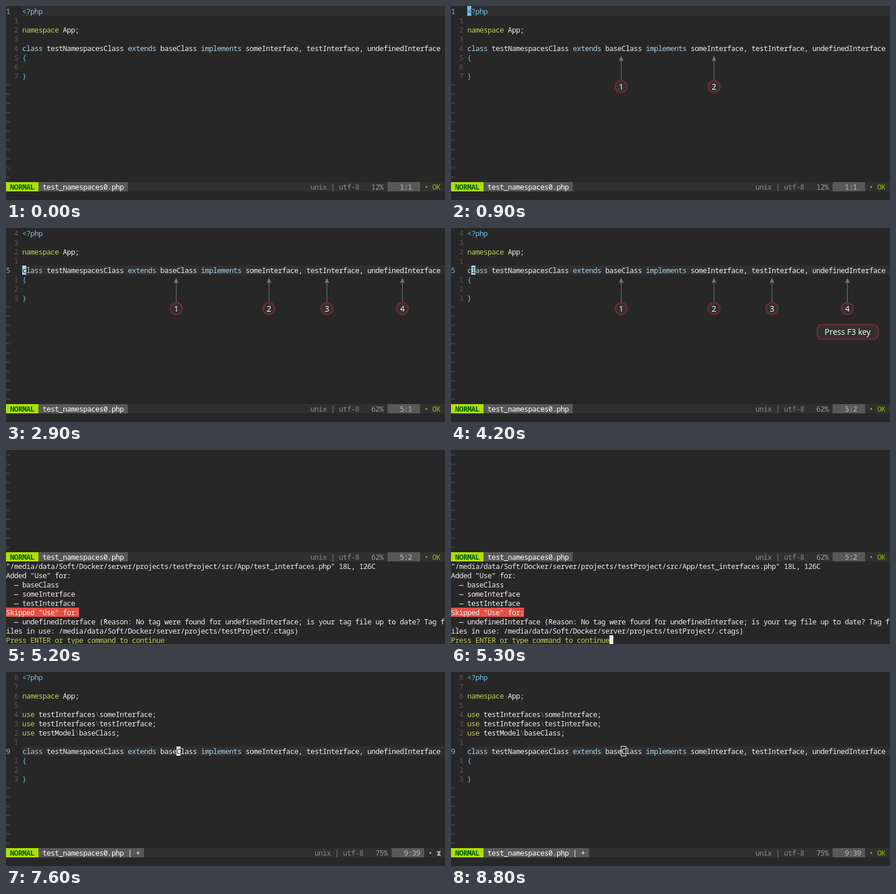
These frames come from a looping animation (757 by 336 pixels, 8900 ms). An HTML page:

```html
<!DOCTYPE html>
<html lang="en">
<head>
<meta charset="utf-8">
<title>PHP namespace import in a terminal editor</title>
<style>
  html, body { margin: 0; width: 100%; height: 100%; overflow: hidden; background: #272727; }
  #stage { position: absolute; left: 0; top: 0; width: 757px; height: 336px; overflow: hidden; background: #272727; }
  .layer, .layer > * { position: absolute; }
  .layer { inset: 0; }
  .cell, #probe {
    font: 500 12.5px/18px "Noto Sans Mono", "DejaVu Sans Mono", monospace;
    font-variant-ligatures: none;
    white-space: pre;
    height: 18px;
  }
  #probe { position: absolute; visibility: hidden; }
  .cell.bold { font-weight: 700; }
  .hollow { box-sizing: border-box; border: 1px solid #eee; }
  svg { left: 0; top: 0; }
  svg text { font: 14px "Open Sans", "Noto Sans", sans-serif; fill: #fff; text-anchor: middle; }
</style>
</head>
<body>
<div id="stage"></div>
<script>
const LOOP = 8900, CW = 7, RH = 16, TOP = 1;
const C = {
  bg: '#272727', line: '#2f2f2f', text: '#f0f0f0', dim: '#5a5a5a', sky: '#a9d3ea',
  blue: '#6fc0ea', lime: '#c6cd58', slash: '#7d7d6a', red: '#e44f45', ring: '#642c30',
  bar: '#303030', seg: '#585858', gray: '#8a8a8a', pale: '#bcbcbc'
};
const stage = document.getElementById('stage');
const start = document.timeline.currentTime || 0;

// Terminal grid: fit the font's natural advance to the cell width.
const probe = stage.appendChild(document.createElement('span'));
probe.id = 'probe';
probe.textContent = 'n'.repeat(100);
const spacing = CW - probe.getBoundingClientRect().width / 100 + 'px';
probe.remove();

// A layer is visible only during the given [from, to) spans.
function layer(...spans) {
  const el = document.createElement('div');
  el.className = 'layer';
  stage.append(el);
  const visible = t => spans.some(([a, b]) => t >= a && t < b) ? 'visible' : 'hidden';
  const times = [...new Set([0, ...spans.flat(), LOOP])].sort((a, b) => a - b);
  const keys = times.map(t => ({
    offset: t / LOOP, visibility: visible(Math.min(t, LOOP - 1)), easing: 'step-end'
  }));
  el.animate(keys, { duration: LOOP, iterations: Infinity }).startTime = start;
  return el;
}

function box(parent, x, y, w, h, color) {
  const el = document.createElement('div');
  el.style.cssText = `left:${x}px;top:${y}px;width:${w}px;height:${h}px;background:${color}`;
  parent.append(el);
  return el;
}

function put(parent, col, row, text, color = C.text, cls = '') {
  const el = document.createElement('span');
  el.className = 'cell ' + cls;
  el.textContent = text;
  el.style.cssText =
    `left:${col * CW}px;top:${TOP + row * RH}px;color:${color};letter-spacing:${spacing}`;
  parent.append(el);
}

// Parts alternate between text and colour.
function write(parent, row, ...parts) {
  let col = 4;
  for (let i = 0; i < parts.length; i += 2) {
    put(parent, col, row, parts[i], parts[i + 1]);
    col += parts[i].length;
  }
}

function fillRow(parent, col, row, cols, color) {
  const y = row ? TOP + row * RH : 0;
  box(parent, col * CW, y, cols * CW, TOP + (row + 1) * RH - y, color);
}

function cursor(col, row, char, color, ...spans) {
  const el = layer(...spans);
  fillRow(el, col, row, 1, color);
  put(el, col, row, char, C.bg);
}

function tildes(parent, from, to) {
  for (let r = from; r <= to; r++) put(parent, 0, r, '~', C.dim);
}

function gutter(parent, rows, current) {
  box(parent, 28, current ? TOP + current * RH : 0, 729, current ? RH : RH + TOP, C.line);
  for (let r = 0; r < rows; r++) {
    if (r === current) put(parent, 0, r, String(r + 1), C.blue);
    else put(parent, 2, r, String(Math.abs(r - current)), C.dim);
  }
}

function status(parent, row, file, percent, pos, busy) {
  const shift = busy ? 1 : 0;
  box(parent, 0, TOP + row * RH, 757, RH, C.bar);
  fillRow(parent, 0, row, 8, '#afdf00');
  put(parent, 1, row, 'NORMAL', '#005f00', 'bold');
  fillRow(parent, 8, row, file.length + 2, C.seg);
  put(parent, 9, row, file, '#fff');
  put(parent, 75 + shift, row, 'unix | utf-8', C.gray);
  put(parent, 90 + shift, row, percent, '#9e9e9e');
  fillRow(parent, 94 + shift, row, 8, C.seg);
  put(parent, 97 + shift, row, pos, C.pale);
  const mark = busy ? C.pale : '#8fbf10';
  put(parent, 103 + shift, row, '•', mark);
  put(parent, 105 + shift, row, busy ? '⧗' : 'OK', mark);
}

function classBlock(parent, row) {
  write(parent, row, 'class ', C.sky, 'testNamespacesClass ', C.text, 'extends ', C.sky,
    'baseClass ', C.text, 'implements ', C.sky,
    'someInterface, testInterface, undefinedInterface', C.text);
  write(parent, row + 1, '{', C.blue);
  write(parent, row + 3, '}', C.blue);
}

function header(parent) {
  write(parent, 0, '<?php', C.blue);
  write(parent, 2, 'namespace ', C.lime, 'App;', C.text);
}

const FILE = 'test_namespaces0.php';

// Editor before the import
for (const [current, percent, pos, from, to] of [
  [0, '12%', '1:1', 0, 2900],
  [4, '62%', '5:1', 2900, 3400],
  [4, '62%', '5:2', 3400, 5200]
]) {
  const el = layer([from, to]);
  gutter(el, 8, current);
  status(el, 19, FILE, percent, pos);
}
const before = layer([0, 5200]);
header(before);
classBlock(before, 4);
tildes(before, 8, 18);
cursor(4, 0, '<', C.blue, [400, 2900]);
cursor(4, 4, 'c', C.sky, [2900, 3400]);
cursor(5, 4, 'l', C.sky, [3400, 3700], [4100, 5200]);

// Callouts
const svg = body => `<svg width="757" height="336">${body}</svg>`;
[293.5, 453.5, 553.5, 683.5].forEach((x, i) => {
  layer([400 + i * 500, 5200]).innerHTML = svg(`
    <path d="M${x} 94V129" stroke="#777"/>
    <path d="M${x} 86l4 9.5l-4 -1.5l-4 1.5z" fill="#777"/>
    <circle cx="${x}" cy="139.5" r="10" fill="#303030" stroke="${C.ring}" stroke-width="3"/>
    <text x="${x}" y="144.5">${i + 1}</text>`);
});
layer([4200, 5200]).innerHTML = svg(`
  <rect x="631.5" y="167.5" width="105" height="25" rx="8" fill="#303030" stroke="${C.ring}" stroke-width="3"/>
  <text x="684" y="185">Press F3 key</text>`);

// Command output
const output = layer([5200, 7600]);
tildes(output, 0, 10);
status(output, 11, FILE, '62%', '5:2');
fillRow(output, 0, 17, 18, C.red);
[
  '"/media/data/Soft/Docker/server/projects/testProject/src/App/test_interfaces.php" 18L, 126C',
  'Added "Use" for:',
  '  — baseClass',
  '  — someInterface',
  '  — testInterface',
  'Skipped "Use" for:',
  '  — undefinedInterface (Reason: No tag were found for undefinedInterface; is your tag file up to date? Tag f',
  'iles in use: /media/data/Soft/Docker/server/projects/testProject/.ctags)'
].forEach((text, i) => put(output, 0, 12 + i, text));
put(output, 0, 20, 'Press ENTER or type command to continue', C.lime);
cursor(39, 20, ' ', C.text, [5300, 5900], [6500, 7100]);

// Editor after the import
const after = layer([7600, LOOP]);
gutter(after, 12, 8);
header(after);
[['testInterfaces', 'someInterface;'], ['testInterfaces', 'testInterface;'], ['testModel', 'baseClass;']]
  .forEach(([space, name], i) =>
    write(after, 4 + i, 'use ', C.lime, space, C.text, '\\', C.slash, name, C.text));
classBlock(after, 8);
tildes(after, 12, 18);
status(layer([7600, 7800]), 19, FILE + ' | +', '75%', '9:39', true);
status(layer([7800, LOOP]), 19, FILE + ' | +', '75%', '9:39');
cursor(42, 8, 'C', '#eee', [7600, 7900], [8500, 8800]);
box(layer([8800, LOOP]), 293, 128, 9, 18, 'transparent').className = 'hollow';
</script>
</body>
</html>
```
